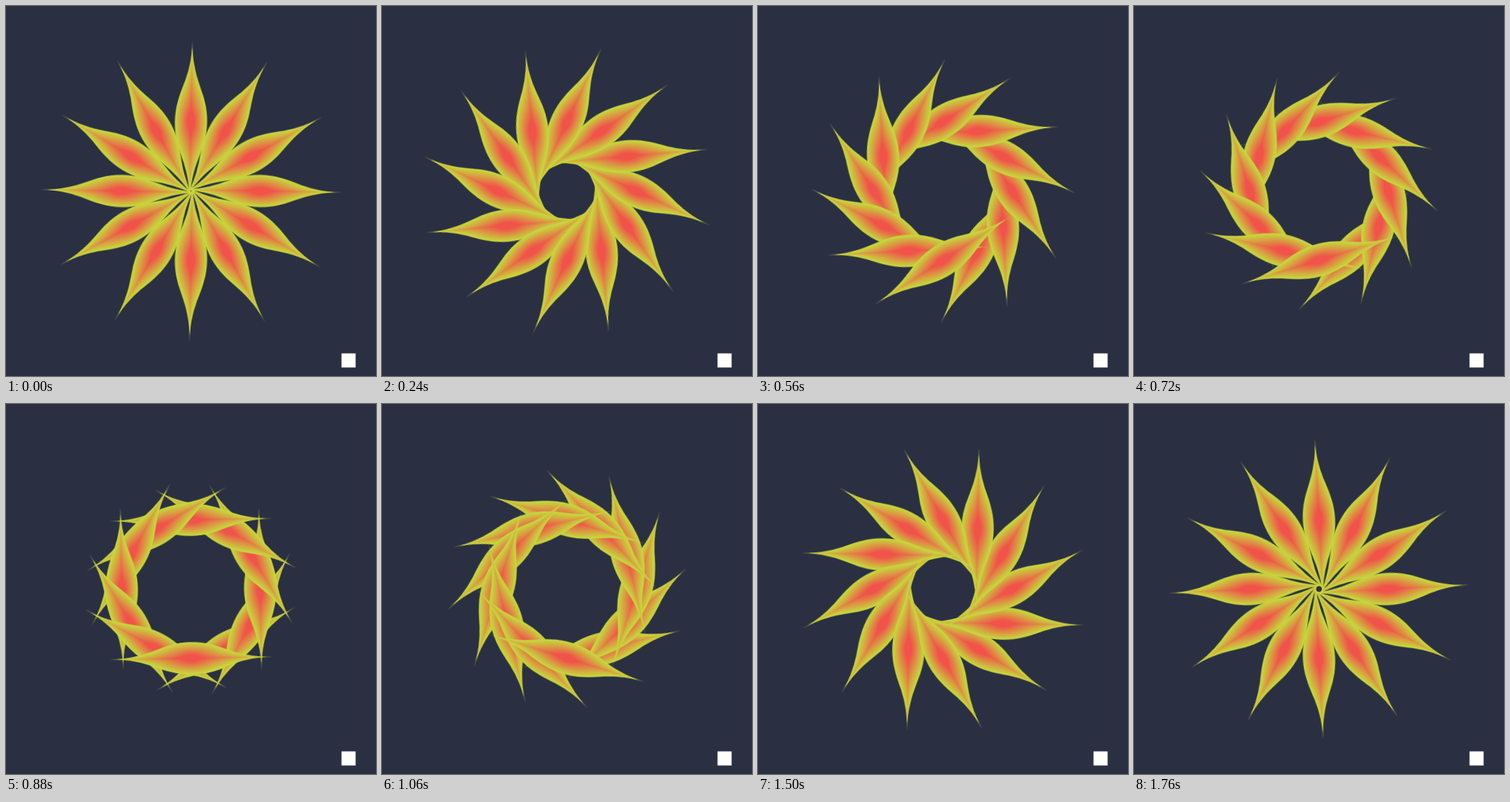
These frames come from a looping animation (499x499 px, 1780 ms). An HTML page:

```html
<!DOCTYPE html>
<html lang="en">
<head>
<meta charset="utf-8">
<title>Turning petals</title>
<style>
  html, body { margin: 0; width: 100%; height: 100%; overflow: hidden; background: #2b2f42; }
  svg { display: block; width: 100%; height: 100%; }
  .petal { transform-origin: 0 0; animation: turn 1780ms steps(89) infinite; }
  @keyframes turn {
    from { transform: rotate(1deg); }
    to { transform: rotate(179deg); }
  }
</style>
</head>
<body>
<svg viewBox="0 0 499 499">
  <g id="flower" transform="translate(249.5 249.5)"></g>
  <rect x="452.5" y="468.5" width="19" height="19" fill="#fff"/>
</svg>
<script>
  const PETALS = 12, LAYERS = 12, RADIUS = 93.3;
  const RIM = 0.92, HEART = 0.23;
  const EDGE = [198, 214, 60], CORE = [241, 82, 73];
  const OUTLINE = 'M-110 0C-54 0 -42 -21.7 0 -21.7S54 0 110 0C54 0 42 21.7 0 21.7S-54 0 -110 0Z';
  const flower = document.getElementById('flower');

  function add(parent, tag, attrs) {
    const el = document.createElementNS('http://www.w3.org/2000/svg', tag);
    for (const name in attrs) el.setAttribute(name, attrs[name]);
    return parent.appendChild(el);
  }

  function mix(t) {
    return `rgb(${EDGE.map((c, i) => Math.round(c + (CORE[i] - c) * t))})`;
  }

  // Stacked from the lower right, counterclockwise, ending at the bottom.
  for (let p = 0; p < PETALS; p++) {
    const angle = 60 - p * 360 / PETALS;
    const arm = add(flower, 'g', { transform: `rotate(${angle}) translate(${RADIUS} 0)` });
    const petal = add(arm, 'g', { class: 'petal' });
    add(petal, 'path', { d: OUTLINE, fill: mix(0) });
    for (let i = 1; i < LAYERS; i++) {
      const scale = RIM - (RIM - HEART) * (i - 1) / (LAYERS - 2);
      add(petal, 'path', { d: OUTLINE, transform: `scale(${scale})`, fill: mix(i / (LAYERS - 1)) });
    }
  }
</script>
</body>
</html>
```
